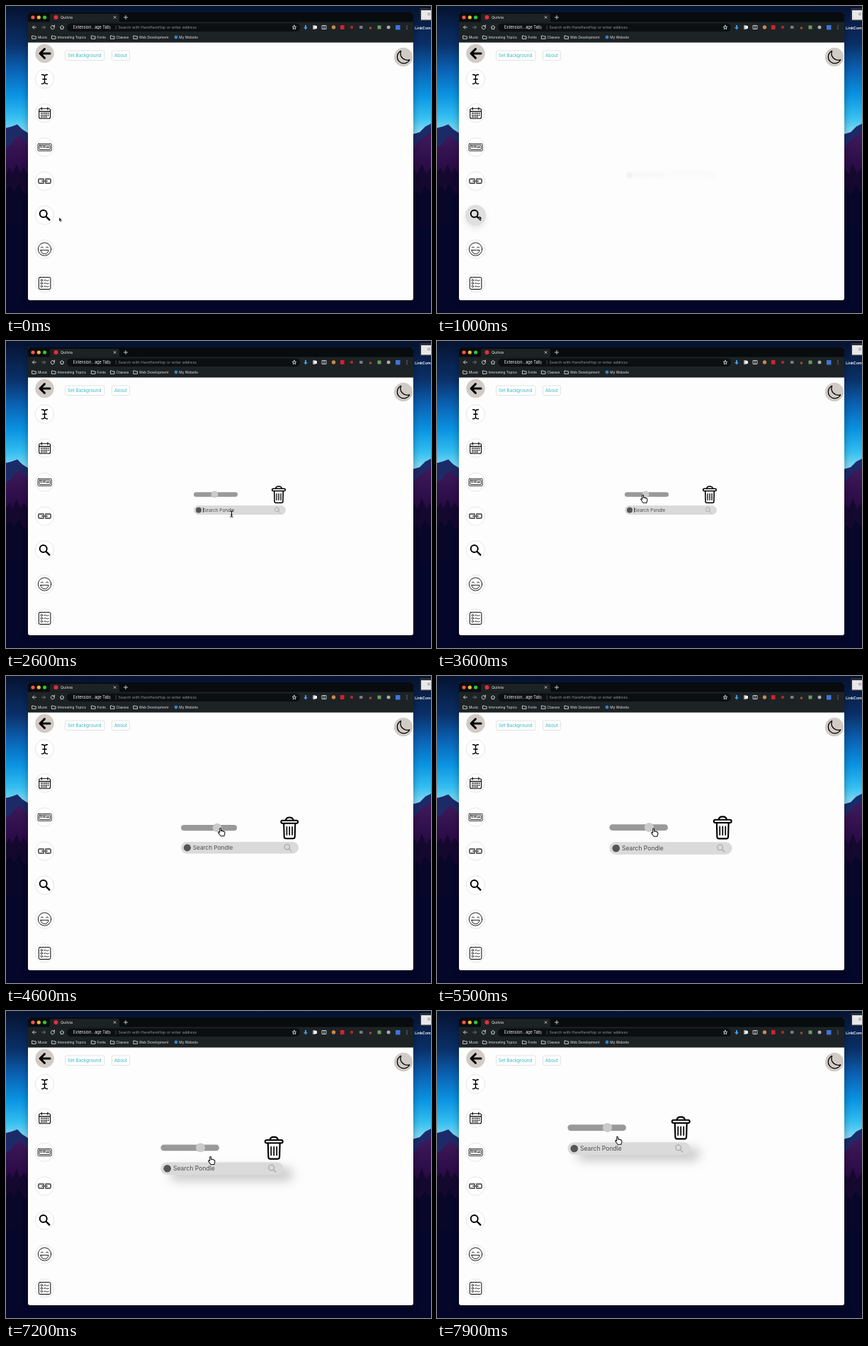
These frames come from a looping animation (600x433 px, 8 s). An HTML page:

```html
<!DOCTYPE html>
<html lang="en">
<head>
<meta charset="utf-8">
<title>New tab widgets</title>
<style>
/* Registered properties keep the scaled artwork sharp while it moves. */
@property --x { syntax: "<length>"; inherits: false; initial-value: 0px; }
@property --y { syntax: "<length>"; inherits: false; initial-value: 0px; }
@property --s { syntax: "<number>"; inherits: false; initial-value: 1; }
@property --o { syntax: "<number>"; inherits: false; initial-value: 1; }

html, body { margin: 0; width: 100%; height: 100%; overflow: hidden; background: #04062a; }
svg { display: block; width: 600px; height: 433px; font-family: Inter, "Open Sans", sans-serif; }
.line { fill: none; stroke: #000; stroke-linecap: round; stroke-linejoin: round; }
.chrome { fill: none; stroke: #d5d8da; stroke-width: .9; stroke-linecap: round; stroke-linejoin: round; }
.marks { font-size: 4.8px; fill: #e4e6e8; }
.btn { fill: #fefefe; stroke: #d9dede; stroke-width: .8; }
.teal { font-size: 6.3px; fill: #35b6c2; }

/* One loop is 8 s, so 1% is 80 ms. */
.move, .grow, .fade { animation: 8s linear infinite; }
.move { transform: translate(var(--x), var(--y)); }
.grow { transform: scale(var(--s)); transform-origin: 330px 225px; }
.fade { opacity: var(--o); }
#hover { animation-name: hover; }
#widget { animation-name: appear; }
#drag { animation-name: drag; animation-timing-function: ease-in-out; }
#size { animation-name: size; }
#thumb { animation-name: thumb; }
#tools { animation-name: tools; }
#caret { animation-name: caret; animation-timing-function: step-end; }
#shadow { animation-name: shadow; }
#cursor { animation-name: travel; animation-timing-function: ease-in-out; }
#arrow, #hand, #beam { animation-timing-function: step-end; }
#arrow { animation-name: arrow; }
#hand { animation-name: hand; }
#beam { animation-name: beam; }

@keyframes hover {
  0%, 5% { --o: 0; }
  8%, 14% { --o: 1; }
  17%, 100% { --o: 0; }
}
@keyframes appear {
  0%, 12% { --o: 0; }
  12.5% { --o: .06; }
  17.5%, 100% { --o: 1; }
}
@keyframes tools {
  0%, 26% { --o: 0; }
  29%, 100% { --o: 1; }
}
@keyframes drag {
  0%, 83.75% { --x: 0px; --y: 0px; }
  97.5%, 100% { --x: -59px; --y: -49px; }
}
@keyframes size {
  0%, 46.5% { --s: 1; }
  57.5% { --s: 1.277; }
  65%, 100% { --s: 1.332; }
}
@keyframes thumb {
  0%, 46.5% { --x: 0px; }
  57.5% { --x: 10.5px; }
  65%, 100% { --x: 12.6px; }
}
@keyframes caret {
  0% { --o: 0; }
  31.25% { --o: 1; }
  37.5% { --o: 0; }
  43.75% { --o: 1; }
  46.25%, 100% { --o: 0; }
}
@keyframes shadow {
  0%, 82.5% { --o: 0; }
  86%, 100% { --o: .75; }
}
@keyframes travel {
  0%, 1.5% { --x: 75px; --y: 298px; }
  8%, 14% { --x: 59.5px; --y: 295.5px; }
  29%, 34% { --x: 318.5px; --y: 244px; }
  43.5%, 46.5% { --x: 290.5px; --y: 217px; }
  57.5% { --x: 302.5px; --y: 214.5px; }
  65%, 70% { --x: 305.5px; --y: 215px; }
  79%, 81.5% { --x: 308.5px; --y: 225.5px; }
  83.75% { --x: 313.5px; --y: 226px; }
  97.5%, 100% { --x: 254.5px; --y: 177px; }
}
@keyframes arrow {
  0% { --o: 1; }
  26%, 100% { --o: 0; }
}
@keyframes hand {
  0% { --o: 0; }
  39%, 100% { --o: 1; }
}
@keyframes beam {
  0% { --o: 0; }
  26% { --o: 1; }
  39%, 100% { --o: 0; }
}
</style>
</head>
<body>
<svg viewBox="0 0 600 433" width="600" height="433">
  <defs>
    <linearGradient id="sky" x1="0" y1="0" x2="0" y2="180" gradientUnits="userSpaceOnUse">
      <stop offset="0" stop-color="#061230"/>
      <stop offset=".3" stop-color="#0a3068"/>
      <stop offset=".5" stop-color="#0a62b4"/>
      <stop offset=".7" stop-color="#0a94e2"/>
      <stop offset=".87" stop-color="#34bef0"/>
      <stop offset="1" stop-color="#8adcf4"/>
    </linearGradient>
    <linearGradient id="ground" x1="0" y1="185" x2="0" y2="310" gradientUnits="userSpaceOnUse">
      <stop offset="0" stop-color="#3c1858"/>
      <stop offset=".35" stop-color="#2a0c46"/>
      <stop offset=".6" stop-color="#10062f"/>
      <stop offset="1" stop-color="#04062a"/>
    </linearGradient>
    <filter id="soft" x="-30%" y="-150%" width="160%" height="400%"><feGaussianBlur stdDeviation="5.5"/></filter>
    <filter id="dim" x="-10%" y="-10%" width="120%" height="120%"><feGaussianBlur stdDeviation="5"/></filter>
    <clipPath id="frame"><rect x="31" y="9" width="544" height="406" rx="3"/></clipPath>
    <circle id="disc" cx="54.5" r="13.2" fill="#fff" stroke="#e2e2e2" stroke-width=".9"/>
    <path id="folder" class="chrome" d="M0 -2h1.9l.8 .9h2.6v3.4h-5.3z"/>
  </defs>

  <!-- wallpaper -->
  <rect width="600" height="433" fill="url(#sky)"/>
  <path d="M0 172L8 170 16 167 23 174 34 181V260H0zM570 182L584 178 592 170 600 166V260H570z" fill="#1d2a68"/>
  <path d="M0 200L7 195 14 186 20 183 34 199V433H0zM570 206L583 190 590 184 600 178V433H570z" fill="url(#ground)"/>
  <path d="M0 236l5-8 4 9 6-14 5 13 5-8 9 14V433H0zM570 240l6-10 5 8 6-16 6 15 7-9V433H570z" fill="#14082f"/>
  <path d="M0 262l6-9 5 10 7-12 6 13 10 2V433H0zM570 268l9-8 5 7 7-13 9 9V433H570z" fill="#080629"/>
  <rect y="310" width="600" height="123" fill="#04062a"/>
  <rect x="584.5" y="3" width="16" height="18" fill="#2c3038"/>
  <rect x="586" y="6" width="15" height="13.500" fill="#e8e8ea"/>
  <circle cx="597" cy="11.500" r="2.300" fill="#bcbcc0"/>
  <text x="577" y="33" font-size="5.400" font-weight="600" fill="#fff">LinkComp</text>
  <rect x="30" y="12" width="546" height="406" fill="#000" opacity=".28" filter="url(#dim)"/>

  <!-- browser window -->
  <g clip-path="url(#frame)">
    <rect x="31" y="9" width="544" height="406" fill="#fdfdfd"/>
    <rect x="31" y="9" width="544" height="42.500" fill="#1d2225"/>
    <rect x="31" y="9" width="544" height="13.500" fill="#090c0e"/>
    <path d="M60 22.500q2 0 2-2V13q0-2 2-2h94q2 0 2 2v7.500q0 2 2 2z" fill="#1d2225"/>
    <circle cx="38" cy="16" r="2.600" fill="#f9564f"/>
    <circle cx="46.300" cy="16" r="2.600" fill="#f8ba2e"/>
    <circle cx="54.600" cy="16" r="2.600" fill="#2ac53f"/>
    <circle cx="70.500" cy="16" r="3" fill="#e02f3c"/>
    <text x="77" y="18" font-size="5.300" fill="#e8eaec">Quilvia</text>
    <path class="chrome" d="M152.200 14.600l2.800 2.800m0-2.800l-2.800 2.800M166.400 16h5.200M169 13.400v5.200"/>

    <!-- toolbar -->
    <path class="chrome" d="M42.500 30h-5m2.200-2.300L37.500 30l2.200 2.300M68 28.600a2.600 2.600 0 1 0 .5 1.600M68.500 27v2h-2M76.200 30l2.800-2.600 2.800 2.600M77.200 29.500v3h3.600v-3"/>
    <path class="chrome" d="M50.500 30h5m-2.200-2.300l2.200 2.300-2.200 2.300" style="stroke:#777c80"/>
    <rect x="86" y="24.500" width="329" height="11.500" rx="5.700" fill="#0c0f11"/>
    <text x="95" y="32" font-size="5.500" fill="#f0f0f0">Extension...age Tab)</text>
    <path d="M155.200 27.200v6" stroke="#666" stroke-width=".6"/>
    <text x="158.500" y="32" font-size="5.450" fill="#8f9396">Search with HareHareHop or enter address</text>
    <path class="chrome" d="M407 27.200l.8 2 2.100.1-1.700 1.400.6 2.100-1.800-1.200-1.800 1.200.6-2.100-1.700-1.400 2.100-.1z"/>
    <path d="M422 27h2v3h1.800L423 33.500 420.200 30H422z" fill="#3c9cf0"/>
    <rect x="433.200" y="27.200" width="4" height="5.600" fill="#b9bec2"/>
    <rect x="435" y="28" width="4" height="4" fill="#f2f2f2"/>
    <path class="chrome" d="M446.500 27.500h5.500v5h-5.500zM449 27.500v5"/>
    <circle cx="462.500" cy="30" r="2.700" fill="#c98a4a"/>
    <rect x="472" y="27" width="5.500" height="6" fill="#d6202c"/>
    <circle cx="488" cy="30" r="2.200" fill="#a52a30"/>
    <rect x="499" y="28" width="4.500" height="4" fill="#777d82"/>
    <circle cx="514.500" cy="31" r="1.800" fill="#a0522f"/>
    <rect x="524.500" y="27.500" width="5" height="5" fill="#6f9a5c"/>
    <circle cx="540" cy="30" r="2.500" fill="#a8adb2"/>
    <rect x="550" y="27" width="6.500" height="6.500" fill="#3d74dc"/>
    <path d="M566 27.800v5" stroke="#ddd" stroke-width="1.100" stroke-linecap="round" stroke-dasharray="0 2.200"/>

    <!-- bookmarks -->
    <use href="#folder" x="37" y="44"/>
    <use href="#folder" x="64.800" y="44"/>
    <use href="#folder" x="120.800" y="44"/>
    <use href="#folder" x="147.800" y="44"/>
    <use href="#folder" x="180.300" y="44"/>
    <circle cx="240" cy="44" r="2.400" fill="#2d86c8"/>
    <g class="marks">
      <text x="45" y="45.800">Music</text>
      <text x="72.500" y="45.800">Interesting Topics</text>
      <text x="128.500" y="45.800">Fonts</text>
      <text x="155.500" y="45.800">Classes</text>
      <text x="188" y="45.800">Web Development</text>
      <text x="244.300" y="45.800">My Website</text>
    </g>

    <!-- page controls -->
    <circle cx="54.500" cy="67" r="13.200" fill="#d2cbc5"/>
    <path class="line" d="M62 67H48.500m6-6.300L48 67l6.500 6.300" stroke-width="3"/>
    <circle cx="561" cy="72" r="13.200" fill="#d2cbc5"/>
    <path class="line" d="M557.600 63.400a9.200 9.200 0 1 0 12.200 12.400a9.600 9.600 0 0 1-12.200-12.400z" stroke-width="1.300"/>
    <rect class="btn" x="83.500" y="63" width="55.500" height="13.500" rx="2"/>
    <rect class="btn" x="149.500" y="63" width="25" height="13.500" rx="2"/>
    <text class="teal" x="87" y="72">Set Background</text>
    <text class="teal" x="153" y="72">About</text>

    <use href="#disc" y="103"/>
    <use href="#disc" y="151"/>
    <use href="#disc" y="199"/>
    <use href="#disc" y="247"/>
    <use href="#disc" y="295"/>
    <use href="#disc" y="343"/>
    <use href="#disc" y="391"/>

    <g id="hover" class="fade">
      <ellipse cx="54.500" cy="300" rx="12" ry="11" fill="#999" opacity=".4" filter="url(#soft)"/>
      <circle cx="54.500" cy="295" r="14.600" fill="#dfdfdf"/>
    </g>

    <path class="line" d="M50.500 96.800q4 0 4 2.500v7.700q0 2.700-4 2.700M58.500 96.800q-4 0-4 2.500v7.700q0 2.700 4 2.700M51.800 103.200h5.400" stroke-width="1.400"/>

    <g class="line" stroke-width="1.100">
      <rect x="46.700" y="144.800" width="15.800" height="14" rx="2"/>
      <path d="M46.700 148.600h15.800M50.300 143v3.200M58.900 143v3.200"/>
      <path d="M49.200 151.300h11.200M49.200 153.900h11.200M49.200 156.500h8.800" stroke-width="1.500" stroke-linecap="butt" stroke-dasharray="1.600 .8"/>
    </g>

    <rect class="line" x="45" y="194.300" width="19.300" height="10" rx="1" stroke-width=".8"/>
    <rect class="line" x="46.900" y="196.200" width="15.500" height="6.200" rx=".6" stroke-width=".8"/>
    <text x="54.600" y="200.400" text-anchor="middle" font-size="2.900" font-weight="800">12:00 pm</text>

    <path class="line" d="M53 245.300v-1.200h-5.800q-1.300 0-1.300 1.300v3.200q0 1.300 1.300 1.300H53v-1.200M56 245.300v-1.200h5.800q1.300 0 1.300 1.300v3.200q0 1.300-1.300 1.300H56v-1.200M51 247h7" stroke-width="2" style="stroke:#666"/>

    <g class="line" stroke-width="2">
      <circle cx="52.700" cy="293" r="5"/>
      <path d="M56.600 297l4.700 4.700" stroke-width="2.400"/>
    </g>

    <g class="line" stroke-width=".9">
      <circle cx="54.500" cy="343" r="9.200"/>
      <path d="M49.300 340.800q1.600-2.400 3.200 0M56.500 340.800q1.600-2.400 3.200 0M49 344.300h11q-.6 5.200-5.500 5.200t-5.500-5.200z"/>
    </g>

    <g class="line" stroke-width="1">
      <rect x="46.300" y="382.700" width="16.600" height="16.800" rx="1.800"/>
      <g stroke-width=".8">
        <circle cx="50.300" cy="386.800" r="1.300"/>
        <circle cx="50.300" cy="391.100" r="1.300"/>
        <circle cx="50.300" cy="395.400" r="1.300"/>
        <path d="M53.500 387q1.600-1.200 3.200 0t3.600 0M53.500 391.300q1.600-1.200 3.200 0t3.600 0M53.500 395.600q1.600-1.200 3.200 0t3.600 0"/>
      </g>
    </g>

    <!-- search widget -->
    <g id="widget" class="fade"><g id="drag" class="move"><g id="size" class="grow">
      <rect id="shadow" class="fade" x="275" y="238" width="130" height="13" rx="6.500" fill="#b2b2b2" filter="url(#soft)"/>
      <rect x="265" y="232" width="130" height="13" rx="6.500" fill="#dadada"/>
      <circle cx="272" cy="238.500" r="4" fill="#555"/>
      <text x="278.200" y="240.800" font-size="6.450" fill="#4c4c4c">Search Pondle</text>
      <path id="caret" class="fade" d="M278.500 235v7" stroke="#222" stroke-width=".8"/>
      <g class="line" style="stroke:#aaa" stroke-width="1">
        <circle cx="382.300" cy="237.600" r="2.900"/>
        <path d="M384.500 239.800l2.600 2.500"/>
      </g>
      <g id="tools" class="fade">
        <rect x="265" y="213.200" width="62" height="6.500" rx="3.250" fill="#999"/>
        <circle id="thumb" class="move" cx="294.500" cy="216.300" r="4.900" fill="#cbcbcb"/>
        <g class="line" stroke-width="1.600">
          <path d="M380.800 208q.4-3 4.200-3t4.200 3"/>
          <rect x="375.700" y="208.300" width="18.600" height="3.200" rx="1.500"/>
          <path d="M378.700 211.700l.4 14.600q.1 2 2 2h7.800q1.900 0 2-2l.4-14.600"/>
          <path d="M382 215.500v8.800M385 215.500v8.800M388 215.500v8.800" stroke-width="1.300"/>
        </g>
      </g>
    </g></g></g>
  </g>

  <!-- pointer -->
  <g id="cursor" class="move">
    <path id="arrow" class="fade" d="M0 0v6l1.400-1.200 1 2.200 1-.4-1-2.200h1.900z" fill="#111" stroke="#fff" stroke-width=".4"/>
    <path id="hand" class="fade" d="M-.8 1q0-1 .9-1t.9 1v3l1.400-.2q.8 0 1 .6 1.300-.2 1.500.6 1.400-.2 1.400 1v2q0 1.200-.8 2.200v1H.6q-.5-1-1.700-2.200-1-1.300-1.600-2.700-.1-1 .8-1 .6 0 1.100.9z" fill="#fff" stroke="#111" stroke-width="1.050" stroke-linejoin="round"/>
    <path id="beam" class="fade" d="M-2.200-4.200q2.200 0 2.200 1.200v6q0 1.200-2.200 1.200M2.200-4.200q-2.200 0-2.200 1.200M0 3q0 1.200 2.200 1.200M-1.300 1.300h2.600" fill="none" stroke="#111" stroke-width="1.100"/>
  </g>
</svg>
</body>
</html>
```
